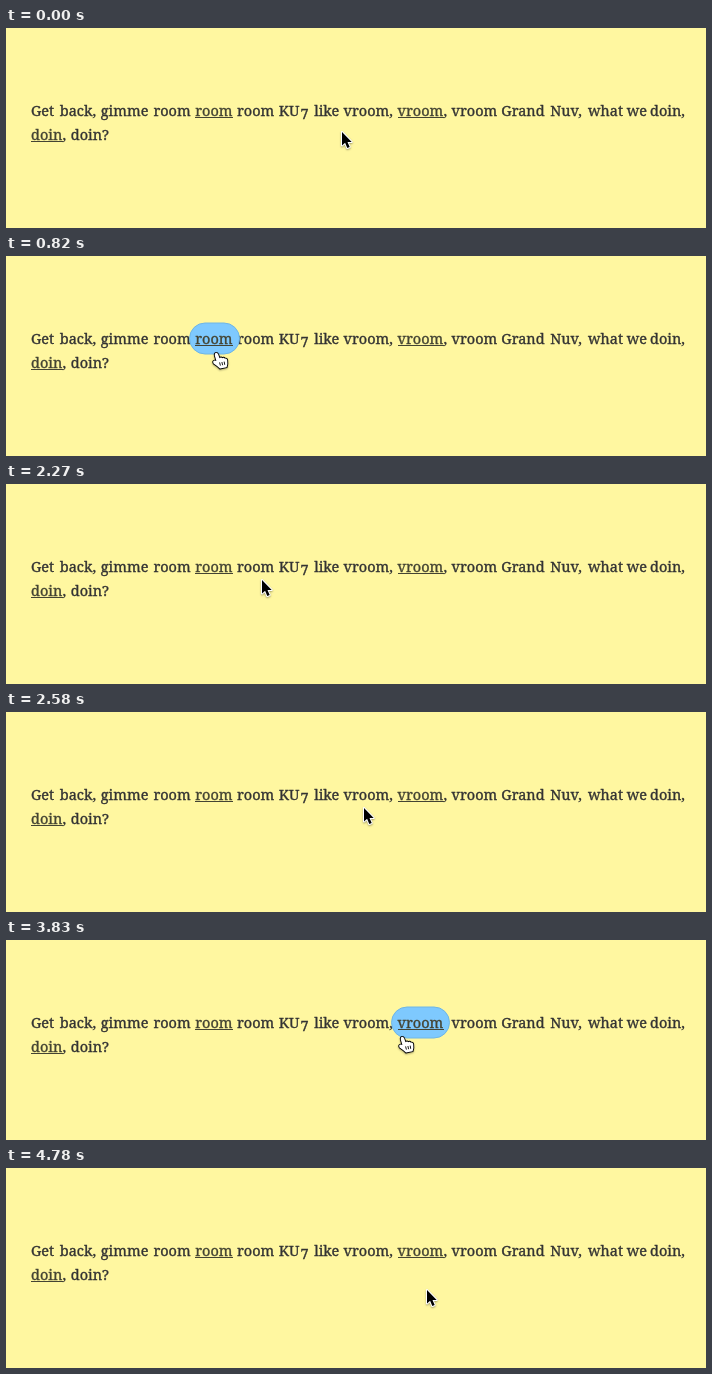
An HTML page with a canvas that plays this animation: 700x200 px, repeating every 4880 ms.

```html
<!DOCTYPE html>
<html lang="en">
<head>
<meta charset="utf-8">
<title>Hover links</title>
<style>
html, body { margin: 0; width: 700px; height: 200px; overflow: hidden; background: #fff7a0; }
canvas { display: block; }
</style>
</head>
<body>
<canvas id="stage" width="700" height="200"></canvas>
<script>
const ctx = document.getElementById('stage').getContext('2d');
const LOOP = 4880;
const LINE1 = 88, LINE2 = 112;
const FONT = '14.5px "Noto Serif", Georgia, serif';

// text, x, baseline
const words = [
  ['Get', 25], ['back,', 53.8], ['gimme', 94.8], ['room', 147.4],
  ['room', 231], ['KU', 272.8], ['7', 294.5, LINE1 + 3], ['like', 308.2],
  ['vroom,', 337.6], [',', 437.5], ['vroom', 445.6], ['Grand', 495.3],
  ['Nuv,', 544.3], ['what', 582.1], ['we', 620.7], ['doin,', 644.1],
  [',', 56.6, LINE2], ['doin?', 64.8, LINE2]
];

const links = [
  { text: 'room', x: 189.2, w: 37.9, y: LINE1 },
  { text: 'vroom', x: 391.6, w: 45.9, y: LINE1 },
  { text: 'doin', x: 25, w: 31.6, y: LINE2 }
];

// time, pointer x, pointer y
const path = [
  [0, 336, 104], [30, 335, 104], [280, 278, 102], [540, 220, 100],
  [570, 217, 98], [820, 211, 97], [1890, 211, 97], [1920, 212, 97],
  [2180, 238, 96], [2440, 304, 95], [2580, 358, 96], [2910, 397, 97],
  [3800, 397, 97], [4230, 370, 97], [4340, 369, 102], [4370, 370, 104],
  [4780, 421, 122], [LOOP, 421, 122]
];

const arrow = new Path2D('M0 0V13.6L3.1 10.8L5.3 16L7.7 15L5.5 10H9.7Z');
const hand = new Path2D(
  'M-.6 8L-2.2 2.4Q-2.6 0 -.9 -.2Q.6 -.2 1.2 1.6L2.5 5.2Q4.2 3.6 5.2 5.2' +
  'Q7 4 7.8 5.8Q9.8 5 10.2 7.2Q10.8 10.4 9.6 14.2L3 15.6' +
  'Q.4 12.8 -3.4 10.4Q-4.6 8.2 -2.6 7.6Z');
const creases = new Path2D('M2.6 9.4L3.4 12.6M4.9 9L5.6 12.2M7.2 8.6L7.7 11.8');

function slope(i, k) {
  if (i === 0 || i === path.length - 1) return 0;
  const rate = j => (path[j + 1][k] - path[j][k]) / (path[j + 1][0] - path[j][0]);
  const a = rate(i - 1), b = rate(i);
  return a * b > 0 ? 2 * a * b / (a + b) : 0;
}

// Monotone cubic through the path points
function pointer(t) {
  let i = 0;
  while (i < path.length - 2 && t >= path[i + 1][0]) i++;
  const h = path[i + 1][0] - path[i][0];
  const u = (t - path[i][0]) / h;
  const along = k => {
    const p = path[i][k], q = path[i + 1][k];
    return p + (q - p) * u * u * (3 - 2 * u) +
      h * u * (1 - u) * ((1 - u) * slope(i, k) - u * slope(i + 1, k));
  };
  return { x: along(1), y: along(2) };
}

function isOver(link, p) {
  return p.x >= link.x - 7 && p.x <= link.x + link.w + 7 &&
    p.y >= link.y - 22 && p.y <= link.y + 10.2;
}

// A hairline stroke gives the slightly heavier weight
function drawText(text, x, y, color) {
  ctx.fillStyle = ctx.strokeStyle = color;
  ctx.lineWidth = 0.35;
  ctx.fillText(text, x, y);
  ctx.strokeText(text, x, y);
}

function drawBlob(link) {
  const left = Math.round(link.x - 6.5) + 0.5;
  ctx.beginPath();
  ctx.roundRect(left, link.y - 21, Math.round(link.w + 12), 31, 15.5);
  ctx.fillStyle = '#7ec9fe';
  ctx.fill();
  ctx.strokeStyle = '#70b6e4';
  ctx.lineWidth = 1;
  ctx.stroke();
}

function drawLink(link) {
  drawText(link.text, link.x, link.y, '#444433');
  ctx.fillRect(Math.round(link.x), link.y + 1, Math.round(link.w), 1);
}

function drawPointer(p, pressing) {
  ctx.save();
  ctx.translate(Math.round(p.x), Math.round(p.y));
  ctx.lineJoin = 'round';
  ctx.shadowColor = 'rgba(0,0,0,.35)';
  ctx.shadowBlur = 2;
  ctx.shadowOffsetY = 1;
  ctx.strokeStyle = pressing ? '#000' : '#fff';
  ctx.lineWidth = pressing ? 1.8 : 2;
  ctx.stroke(pressing ? hand : arrow);
  ctx.shadowColor = 'transparent';
  ctx.fillStyle = pressing ? '#fff' : '#000';
  ctx.fill(pressing ? hand : arrow);
  if (pressing) {
    ctx.lineWidth = 0.9;
    ctx.stroke(creases);
  }
  ctx.restore();
}

function draw(t) {
  const p = pointer(t);
  const hovered = links.find(link => isOver(link, p));
  ctx.fillStyle = '#fff7a0';
  ctx.fillRect(0, 0, 700, 200);
  ctx.font = FONT;
  ctx.lineJoin = 'round';
  for (const [text, x, y = LINE1] of words) drawText(text, x, y, '#333333');
  if (hovered) drawBlob(hovered);
  links.forEach(drawLink);
  drawPointer(p, Boolean(hovered));
}

const start = performance.now();
function tick(now) {
  draw(Math.max(0, now - start) % LOOP);
  requestAnimationFrame(tick);
}
draw(0);
requestAnimationFrame(tick);
</script>
</body>
</html>
```
